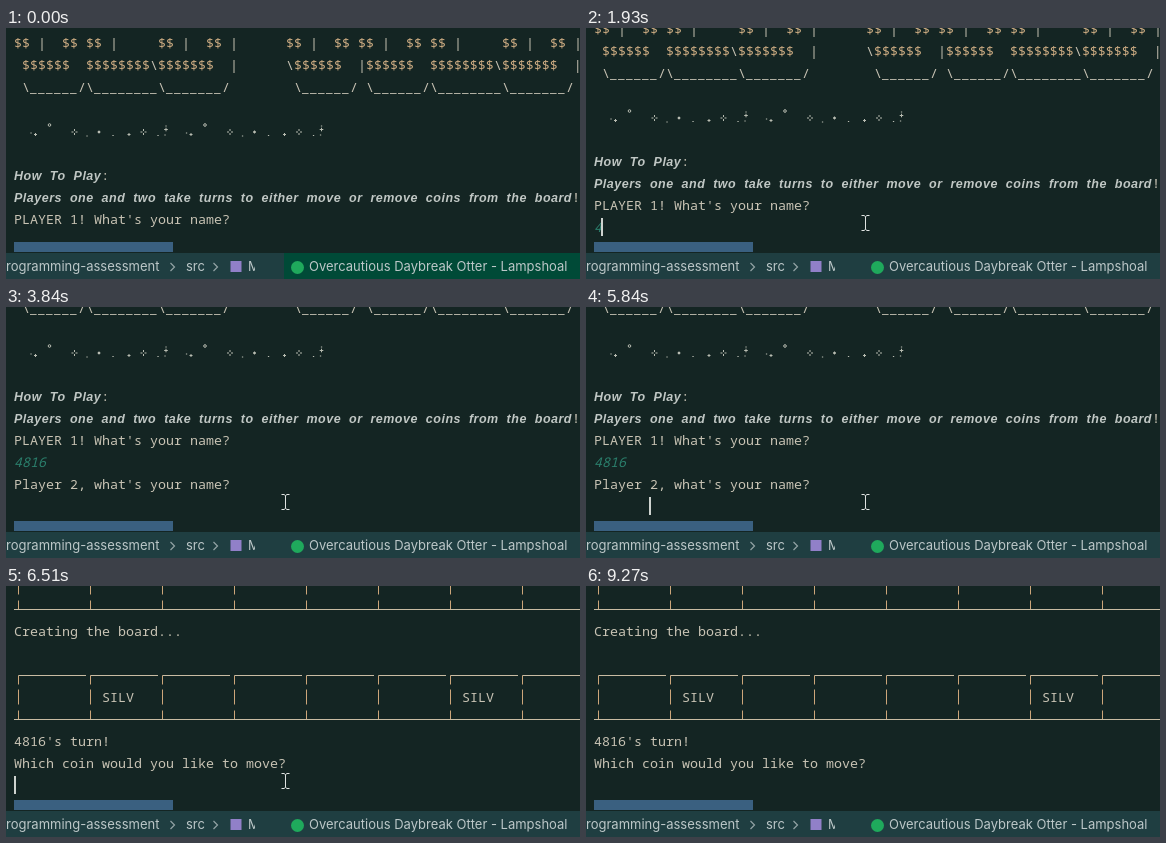
Animation, 574 px wide and 251 px high, one loop 9400 ms. Source, as an HTML page:

```html
<!DOCTYPE html>
<html lang="en">
<head>
<meta charset="utf-8">
<title>Coin game console</title>
<style>
  html, body { margin: 0; width: 100%; height: 100%; overflow: hidden; background: #142523; }
  svg { display: block; width: 574px; height: 251px; }
  text { white-space: pre; }
  .mono { font: 13.333px "Noto Sans Mono", "DejaVu Sans Mono", monospace; fill: #c8c3b4; }
  .coin { font-weight: 500; fill: #cbab82; }
  .low { font-size: 11px; letter-spacing: 1.4px; }
  .input { font-style: italic; fill: #2b7f6c; }
  .fancy { font: italic bold 12.5px "Liberation Sans", Arial, sans-serif; letter-spacing: .5px; word-spacing: 3.95px; fill: #c0c7c4; }
  .mark { font-style: normal; font-weight: 400; letter-spacing: 0; word-spacing: 0; }
  .bar { font: 13px Inter, Roboto, sans-serif; fill: #bcc7c8; }
  .rails { fill: none; stroke: #c9bca3; }
  .posts { fill: none; stroke: #cda67a; }
  .stars { fill: none; stroke: #b9bdb2; }
</style>
</head>
<body>
<svg id="stage" viewBox="0 0 574 251">
  <rect width="574" height="251" fill="#142523"/>
  <g id="doc"></g>
  <rect x="8" y="214" width="159" height="10" fill="#3a6080"/>
  <rect y="225" width="574" height="26" fill="#1f3e41"/>
  <rect id="hover" x="278" y="225" width="296" height="26" fill="#004a37"/>
  <g class="bar">
    <text x="0" y="243">rogramming-assessment</text>
    <text x="180" y="243">src</text>
    <svg x="241" y="225" width="8" height="26"><text x="1" y="18">Main.kt</text></svg>
    <text x="303" y="243">Overcautious Daybreak Otter - Lampshoal</text>
  </g>
  <path d="M164.5 235l4 4l-4 4M207.5 235l4 4l-4 4" fill="none" stroke="#93a3a5" stroke-width="1.2"/>
  <rect x="224.5" y="233" width="11" height="11" fill="#9180c8"/>
  <circle cx="291.5" cy="239.5" r="6.5" fill="#1fa95c"/>
  <path id="beam" d="M-3.5 -7.5H-1L.5 -6.5L2 -7.5H4.500M.5 -6.5V6.500M-3.5 7.5H-1L.5 6.5L2 7.5H4.5" fill="none" stroke="#dfe3e1"/>
  <path id="arrow" d="M0 0V14L3.3 11L5.5 16L7.7 15L5.5 10.2H10Z" fill="#fff" stroke="#111" stroke-width=".8"/>
</svg>
<script>
const LOOP = 9400, LINE = 22, CELL = 8, LEFT = 8;
const NAME = "4816";
const $ = id => document.getElementById(id);
const doc = $("doc");

function add(tag, attrs, parent = doc) {
  const el = document.createElementNS("http://www.w3.org/2000/svg", tag);
  for (const key in attrs) el.setAttribute(key, attrs[key]);
  parent.appendChild(el);
  return el;
}

function write(row, str, cls = "mono", col = 0, parent = doc) {
  const el = add("text", { x: LEFT + col * CELL, y: row * LINE + 5, class: cls }, parent);
  el.textContent = str;
  return el;
}

const span = (el, str, cls = "") => add("tspan", { class: cls }, el).textContent = str;

function art(row, str) {
  const el = write(row, ""), looks = { $: "coin", _: "low" };
  for (const run of str.match(/\$+|_+|[^$_]+/g)) span(el, run, looks[run[0]]);
}

function fancy(row, str, mark) {
  const el = write(row, "", "fancy");
  span(el, str);
  span(el, mark, "mono mark");
}

// One run of sparkles, drawn around the middle of its row
function stars(row, dx) {
  const plus = (x, y, s) => `M${x - s} ${y}h${2 * s}M${x} ${y - s}v${2 * s}`;
  const dot = (x, y) => `M${x - .6} ${y}h1.3`;
  const gap = (x, y) => `M${x - 3} ${y}h2M${x + 1} ${y}h2M${x} ${y - 3}v2M${x} ${y + 1}v2`;
  const d = dot(25, 2) + plus(29.5, 3.5, 1.5) + gap(68.5, 1) + dot(81, 5) +
    plus(93, 1, 1.5) + "M92 0l2 2M94 0l-2 2" + dot(107, 4.5) + plus(123, 3.5, 1.5) +
    gap(137.5, 1) + dot(152, 4.5) + plus(160, -1.5, 1.8) + dot(160, -5) + dot(159, 4);
  const g = add("g", { class: "stars", transform: `translate(${dx} ${row * LINE})` });
  add("path", { d }, g);
  add("circle", { cx: 43.5, cy: -6, r: 1.3 }, g);
}

function board(row, parent) {
  const top = row * LINE + .5, mid = top + LINE, low = mid + LINE;
  let rails = `M8 ${low}H574`, posts = "";
  for (let x = 12.5; x < 574; x += 9 * CELL) {
    rails += `M${x} ${top}h67.5`;
    posts += `M${x} ${top}v9M${x} ${mid - 8}v15M${x} ${low - 9}v9`;
  }
  add("path", { d: posts, class: "posts" }, parent);
  add("path", { d: rails, class: "rails" }, parent);
}

art(0, "$$ |  $$ $$ |     $$ |  $$ |      $$ |  $$ $$ |  $$ $$ |     $$ |  $$ |");
art(1, " $$$$$$  $$$$$$$$\\$$$$$$$  |      \\$$$$$$  |$$$$$$  $$$$$$$$\\$$$$$$$  |");
art(2, " \\______/\\________\\_______/        \\______/ \\______/\\________\\_______/");
stars(4, 0);
stars(4, 155.5);
fancy(6, "How To Play", ":");
fancy(7, "Players one and two take turns to either move or remove coins from the board", "!");
write(8, "PLAYER 1! What's your name?");
const typed = write(9, "", "mono input");
const second = write(10, "Player 2, what's your name?");
const game = add("g", {});
board(13, game);
write(16, "Creating the board...", "mono", 0, game);
board(18, game);
write(19, "SILV", "mono", 11, game);
write(19, "SILV", "mono", 56, game);
write(21, NAME + "'s turn!", "mono", 0, game);
write(22, "Which coin would you like to move?", "mono", 0, game);
const caret = add("rect", { width: 2, height: 18, fill: "#ced3cf" });

// Stepped tracks: [time, ...values]
const scroll = [[0, 15], [1800, 8], [1930, 1], [3220, -43], [6170, -65], [6370, -167], [6440, -245], [6510, -307]];
const keys1 = [1800, 2140, 2340, 2870];
const keys2 = [4710, 4900, 5040, 5240, 5370, 5570, 5840];
const blink = [[0, 0], [730, 1], [1270, 0], [1800, 1], [3840, 0], [4300, 1], [7380, 0], [7860, 1], [8390, 0], [8830, 1], [9270, 0]];
const enter = [[0, 300, 262], [290, 299, 246], [360, 295, 236], [430, 290, 221], [500, 285, 208], [590, 281, 199], [730, 279, 196], [860, 279, 195], [8120, 279, 194], [8180, 279, 195]];

const at = (track, t) => track.findLast(k => k[0] <= t).slice(1);
const count = (times, t) => times.filter(k => k <= t).length;
const show = (el, on) => el.setAttribute("visibility", on ? "visible" : "hidden");

function mouse(t) {
  if (t < 8390) return at(enter, t);
  const step = Math.min(7, Math.floor((t - 8390) / 75.7));
  return [279 + 1.5 * step, step < 7 ? 195 + 8.5 * step : 262];
}

function caretCell(t) {
  if (t < 1800) return [8, 27];
  if (t < 3220) return [9, count(keys1, t)];
  if (t < 6170) return [11, count(keys2, t)];
  return t < 6370 ? [12, 0] : [23, 0];
}

function draw(t) {
  doc.setAttribute("transform", `translate(0 ${at(scroll, t)[0]})`);
  typed.textContent = NAME.slice(0, count(keys1, t));
  show(second, t >= 3220);
  show(game, t >= 6170);

  // The caret straddles the cell edge but never leaves the text area
  const [row, col] = caretCell(t);
  caret.setAttribute("x", LEFT + Math.max(0, col * CELL - 1));
  caret.setAttribute("y", row * LINE - 9);
  show(caret, at(blink, t)[0]);

  const [x, y] = mouse(t), onBar = y >= 224;
  for (const id of ["beam", "arrow"]) $(id).setAttribute("transform", `translate(${x} ${y})`);
  show($("beam"), !onBar);
  show($("arrow"), onBar && y < 251);
  show($("hover"), onBar && t < 8920);
}

const start = performance.now();
function tick() {
  draw((performance.now() - start) % LOOP);
  requestAnimationFrame(tick);
}
tick();
</script>
</body>
</html>
```
